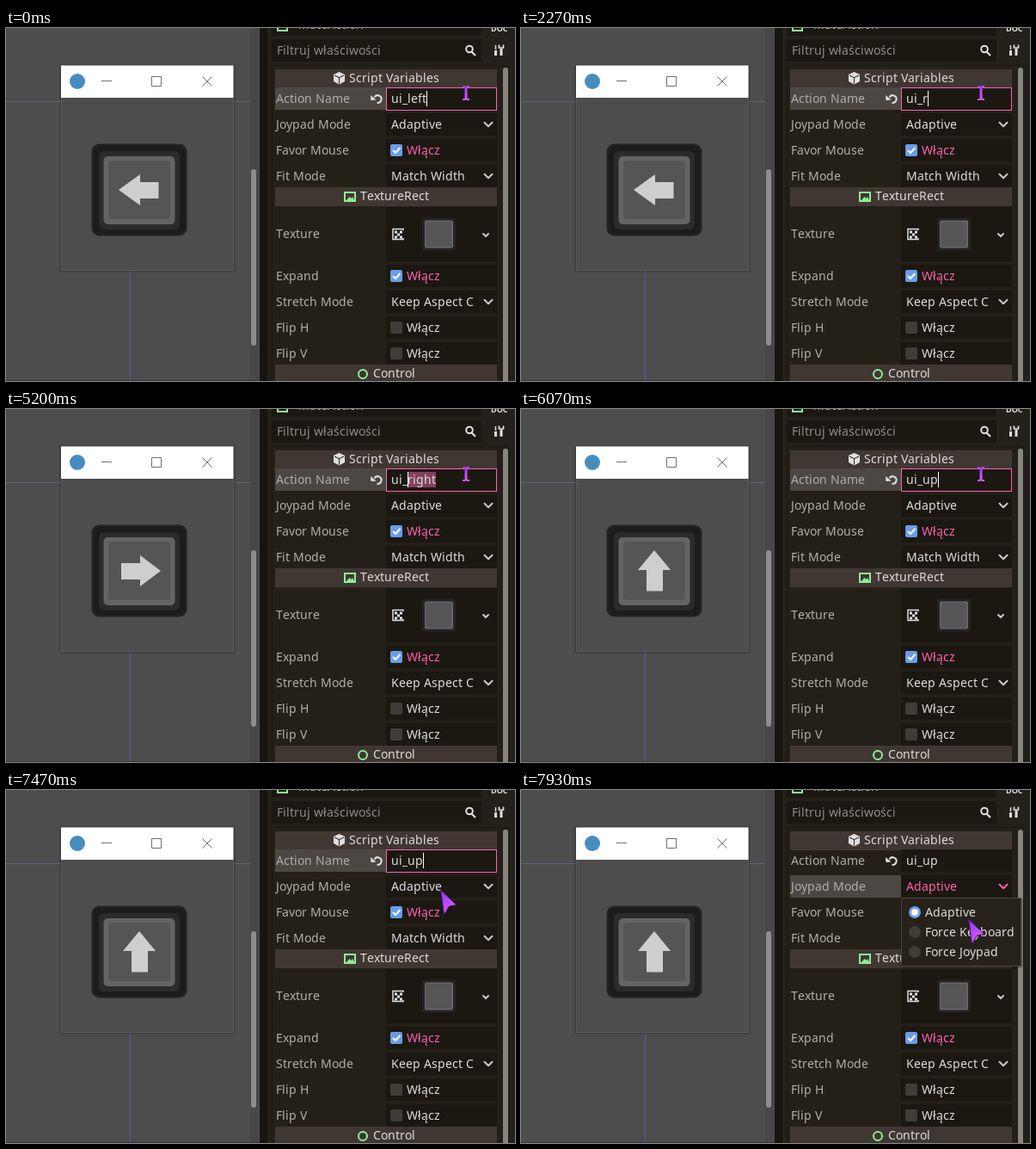
Recreate the animation shown at these times as an HTML page. Size 592 px wide and 410 px high, loop 8000 ms.

```html
<!DOCTYPE html>
<html lang="pl">
<head>
<meta charset="utf-8">
<title>Inspector</title>
<style>
html, body { margin: 0; width: 100%; height: 100%; overflow: hidden; background: #4d4d4d; }
svg { display: block; }
text { font: 14px "Noto Sans", sans-serif; white-space: pre; }
</style>
</head>
<body>
<svg id="stage" width="592" height="410" viewBox="0 0 592 410"></svg>
<script>
const LOOP = 8000;
const DARK = '#1b1812', PANEL = '#24201a', HEAD = '#403732';
const LABEL = '#b0aeaa', TEXT = '#dddcda', PINK = '#ff5fac', GREEN = '#8eef97';
const pen = document.createElement('canvas').getContext('2d');
pen.font = '14px "Noto Sans", sans-serif';

// Glyph advances snap to whole pixels, as in the editor's hinted font.
function stops(str, x) {
  const xs = [x];
  for (const ch of str) xs.push(xs[xs.length - 1] + Math.round(pen.measureText(ch).width));
  return xs;
}

const rect = (x, y, w, h, fill, more = '') =>
  `<rect x="${x}" y="${y}" width="${w}" height="${h}" fill="${fill}" ${more}/>`;
const line = (d, color, w = 2, more = '') =>
  `<path d="${d}" fill="none" stroke="${color}" stroke-width="${w}" ${more}/>`;
const text = (str, x, y, fill = TEXT, more = '') =>
  `<text x="${stops(str, x).slice(0, str.length).join(' ')}" y="${y}" fill="${fill}" ${more}>${str}</text>`;
const chevron = (x, y, color, more = '') =>
  line(`M${x - 4.5} ${y - 2.3}l4.5 4.5l4.5 -4.5`, color, 2, `stroke-linecap="round" stroke-linejoin="round" ${more}`);
const field = (y, h = 26) => rect(442, y, 129, h, DARK);
const row = (name, y) => text(name, 314, y + 5, LABEL) + field(y - 13);

function option(name, value, y, id) {
  return row(name, y) + `<g id="${id}">` + text(value, 448, y + 5) + chevron(561, y, '#c9c8c6') + '</g>';
}

function check(name, y, on) {
  return row(name, y) + rect(447, y - 7, 14, 14, on ? '#699ce8' : '#403d39', 'rx="2"') +
    (on ? line(`M450 ${y}l3 3l5.5 -6`, '#fff') : '') +
    text('Włącz', 466, y + 5, on ? PINK : TEXT);
}

const header = (name, x, y) => rect(313, y, 258, 22, HEAD) + text(name, x, y + 15);

function keycap() {
  return rect(99.5, 134.5, 111, 107, '#222', 'rx="9"') +
    rect(102, 137, 106, 102, '#1c1c1c', 'rx="8"') +
    rect(108, 143, 94, 91, '#2b2b2b', 'rx="6"') +
    rect(113.5, 149, 83, 79, '#646464', 'rx="5"') +
    rect(119, 154, 72, 68, '#555', 'rx="4"');
}

function appWindow() {
  return rect(63, 43, 203, 240, '#000', 'opacity=".3" filter="url(#soft)"') +
    rect(64, 43.5, 201, 238.5, '#4d4d4d') +
    line('M64.5 81V281.5H264.5V81', '#5c5c5c', 1) +
    rect(64, 43.5, 200.5, 37.5, '#fff') +
    '<circle cx="83" cy="62" r="9" fill="#478cbf"/>' +
    line('M111 61.5h12M169.5 56.5h11v11h-11zM228.5 56.5l11 11m0 -11l-11 11', '#707070', 1) +
    keycap() + '<path id="arrow" fill="#cecece"/>';
}

function viewport() {
  return rect(0, 0, 295, 410, '#4d4d4d') +
    rect(0, 85, 285, 1, '#62627a') +
    rect(144, 282, 1, 128, '#5757a6') +
    rect(284, 0, 10, 410, '#474747') +
    rect(285, 164, 6, 205, '#8d8d8d', 'rx="3"') +
    rect(0, 409, 295, 1, '#403434') + appWindow();
}

function topBar() {
  return rect(295, 0, 297, 410, '#181510') + rect(304, 0, 288, 410, PANEL) +
    rect(309, 0, 244, 9, DARK) +
    line('M316 -6h11v9h-11z', GREEN) +
    text('MateAction', 340, 1, LABEL) +
    `<text x="564" y="4" fill="#e0e0e0" style="font-size:9px;font-weight:800">DOC</text>` +
    rect(309, 13, 244, 26, DARK) +
    text('Filtruj właściwości', 315, 31, '#8d8b87') +
    '<circle cx="539" cy="24.5" r="3.8" fill="none" stroke="#e0e0e0" stroke-width="2"/>' +
    line('M541.5 27.5l4.5 4.5', '#e0e0e0', 2.2) +
    line('M569.5 25v-5', '#e0e0e0', 1.5) +
    line('M569.5 26v6M576 24v8', '#e0e0e0', 3) +
    line('M573.5 19.5v3.5h5v-3.5', '#e0e0e0', 1.7);
}

function thumb() {
  return rect(484, 220.5, 39, 38, '#242424', 'rx="3"') +
    rect(487, 223.5, 33, 32, '#686868', 'rx="2"') +
    rect(488.5, 225, 30, 29, '#565656', 'rx="1.5"');
}

function inspector() {
  return rect(309, 43, 276, 367, '#1b1812') + rect(310, 44, 274, 366, '#242018') +
    rect(578, 46, 6, 370, '#88857f', 'rx="3"') +
    header('Script Variables', 399, 48) +
    '<path d="M387.5 51l6.5 3v8l-6.5 3.5l-6.5 -3.5v-8z" fill="#e0e0e0"/>' +
    line('M382 55l5.500 2.700l5.500 -2.700M387.500 57.700v7', HEAD, 1.2) +
    rect(313, 69, 129, 26, '#4b4844', 'id="nameHot"') +
    rect(313, 99, 129, 26, '#4b4844', 'id="joyHot"') +
    row('Action Name', 82) +
    line('M428.5 80.500a4.300 4.300 0 1 1 3 6.300', '#e0e0e0') +
    '<path d="M424 78l0.500 6l6 -0.500z" fill="#e0e0e0"/>' +
    rect(442.5, 69.5, 128, 26, 'none', `stroke="${PINK}" id="focus"`) +
    '<rect id="sel" y="73" height="18" fill="#83405f"/>' +
    `<text id="value" y="87" fill="${TEXT}"></text>` +
    '<rect id="caret" y="73" width="1" height="18" fill="#fff"/>' +
    option('Joypad Mode', 'Adaptive', 112, 'joy') +
    check('Favor Mouse', 142, true) +
    option('Fit Mode', 'Match Width', 172, 'fit') +
    header('TextureRect', 412, 185) +
    line('M394 191h12v10h-12z', GREEN) +
    `<path d="M396 200l3.500 -4l2 2l1.500 -2l2 4z" fill="${GREEN}"/>` +
    text('Texture', 314, 244, LABEL) + field(208, 63) +
    line('M462 235v-1.500h-12v12h12v-1.500', '#e0e0e0', 1.5) +
    line('M452 237h3m3 0h3M455 240h3M452 243h3m3 0h3', '#e0e0e0', 3) +
    thumb() + line('M555 239l3 3l3 -3', '#c9c8c6', 2, 'stroke-linecap="round"') +
    check('Expand', 288, true) +
    option('Stretch Mode', 'Keep Aspect C', 318, 'stretch') +
    check('Flip H', 348) + check('Flip V', 378) +
    header('Control', 427, 391) +
    `<circle cx="415" cy="402" r="5" fill="none" stroke="${GREEN}" stroke-width="2"/>`;
}

function popup() {
  const items = ['Adaptive', 'Force Keyboard', 'Force Joypad'].map((name, i) => {
    const y = 142 + 23 * i;
    return `<circle cx="458" cy="${y}" r="7" fill="${i ? '#403d39' : '#699ce8'}"/>` +
      (i ? '' : `<circle cx="458" cy="${y}" r="4" fill="#fff"/>`) + text(name, 470, y + 5);
  });
  return '<g id="popup">' +
    rect(442, 127, 141, 79, '#000', 'opacity=".45" filter="url(#soft)"') +
    rect(442.5, 125.5, 139, 79, '#26221a', 'stroke="#4b4740"') + items.join('') + '</g>';
}

const stage = document.getElementById('stage');
stage.innerHTML = `<defs>
  <filter id="soft"><feGaussianBlur stdDeviation="1"/></filter>
  <linearGradient id="glow" x1="0" y1="0" x2=".6" y2="1">
    <stop offset="0" stop-color="#8237f0"/><stop offset="1" stop-color="#e85cff"/>
  </linearGradient></defs>` +
  viewport() + topBar() + inspector() + popup() +
  '<path id="beam" d="M-4 -8.500h3l1 1l1 -1h3v2h-2.500v13h2.500v2h-3l-1 -1l-1 1h-3v-2h2.500v-13h-2.500z" fill="url(#glow)"/>' +
  '<path id="pointer" d="M0 0L18.500 17.500L10 19L4 29z" fill="url(#glow)" stroke="#3a1560" stroke-width="1" stroke-linejoin="round"/>';

const el = {};
stage.querySelectorAll('[id]').forEach(n => el[n.id] = n);

// time, text, caret index, caret lit; the selection runs from the caret to the end
const edits = [
  [0, 'ui_left', 7, 1], [330, 'ui_left', 7, 0], [670, 'ui_left', 7, 1],
  [870, 'ui_left', 6, 1], [1070, 'ui_left', 5, 1], [1200, 'ui_left', 4, 1],
  [1400, 'ui_left', 3, 1], [2000, 'ui_left', 3, 0],
  [2270, 'ui_r', 4, 1], [2330, 'ui_ri', 5, 1], [2470, 'ui_rig', 6, 1],
  [2600, 'ui_righ', 7, 1], [2670, 'ui_right', 8, 1],
  [3330, 'ui_right', 8, 0], [4000, 'ui_right', 8, 1],
  [4600, 'ui_right', 7, 1], [4730, 'ui_right', 6, 1], [4930, 'ui_right', 5, 1],
  [5070, 'ui_right', 4, 1], [5200, 'ui_right', 3, 1], [5870, 'ui_right', 3, 0],
  [5930, 'ui_u', 4, 1], [6000, 'ui_up', 5, 1], [6670, 'ui_up', 5, 0],
  [7330, 'ui_up', 5, 1], [7530, 'ui_up', 5, 0]
];
// time, x, y of the mouse
const moves = [
  [0, 535, 75.5], [6870, 519, 77], [6930, 494, 82], [7000, 473, 86.5],
  [7070, 458, 87], [7130, 470, 98], [7200, 512, 120], [7270, 544, 127],
  [7330, 507, 116], [7470, 505.5, 116], [7870, 465, 141], [7930, 520.5, 150]
];
const arrows = [
  [0, 'M131 188L156 170V179H177.500V198H156V206z'],
  [2670, 'M180 188L156 170V179H134V198H156V206z'],
  [6070, 'M155 164L174 187H165V211.500H146V187H136z']
];

const at = (list, t) => list.findLast(k => k[0] <= t);
const show = (node, on) => node.setAttribute('visibility', on ? 'visible' : 'hidden');
function set(node, attrs) {
  for (const k in attrs) node.setAttribute(k, attrs[k]);
}

function draw(t) {
  const [, str, caret, lit] = at(edits, t);
  const xs = stops(str, 448);
  set(el.value, { x: xs.slice(0, str.length).join(' ') });
  el.value.textContent = str;
  set(el.caret, { x: xs[caret] });
  set(el.sel, { x: xs[caret], width: xs[str.length] - xs[caret] });
  show(el.caret, lit);
  set(el.arrow, { d: at(arrows, t)[1] });

  const picked = t >= 7530;
  show(el.focus, !picked);
  show(el.nameHot, !picked);
  show(el.joyHot, picked);
  el.joy.querySelector('text').setAttribute('fill', picked ? PINK : TEXT);
  el.joy.querySelector('path').setAttribute('stroke', picked ? PINK : '#c9c8c6');
  show(el.popup, t >= 7600);

  const [, x, y] = at(moves, t);
  const inField = y < 95;
  for (const n of [el.beam, el.pointer]) set(n, { transform: `translate(${x} ${y})` });
  show(el.beam, inField);
  show(el.pointer, !inField);
}

const start = performance.now();
function tick() {
  draw((performance.now() - start) % LOOP);
  requestAnimationFrame(tick);
}
tick();
</script>
</body>
</html>
```
